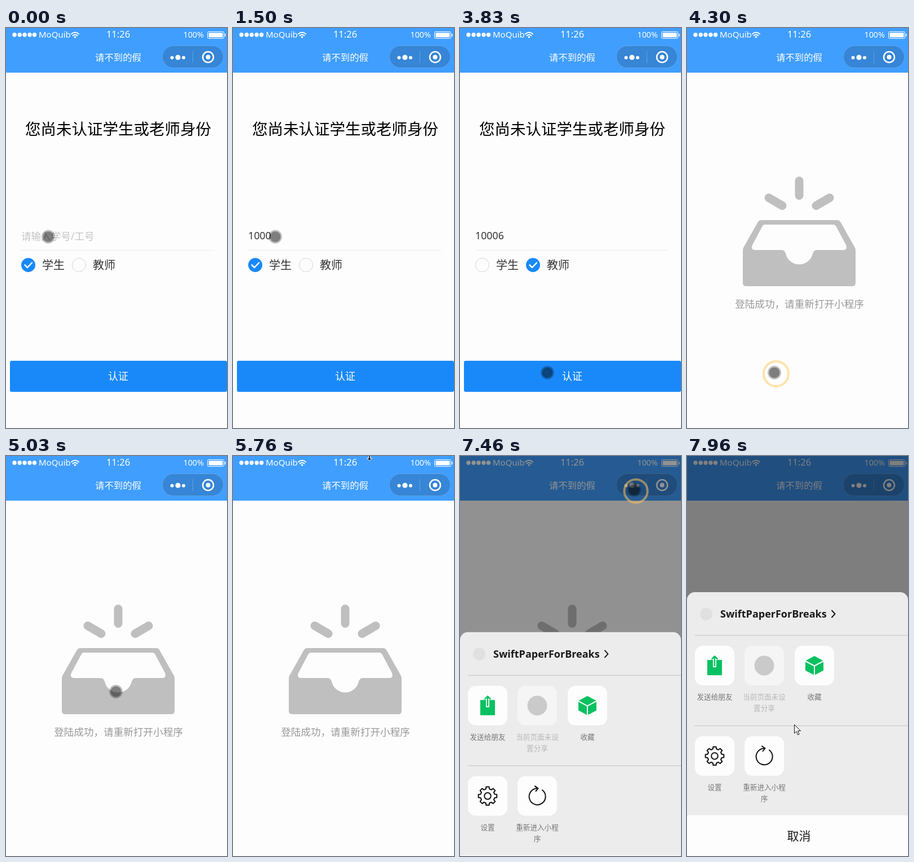
Write an HTML page that moves like this. It is 392 px wide and 708 px high and loops after 8000 ms.

```html
<!DOCTYPE html>
<html lang="zh-CN">
<head>
<meta charset="utf-8">
<style>
  html, body { margin: 0; width: 100%; height: 100%; overflow: hidden; background: #fdfdfd; }
  svg { display: block; width: 392px; height: 708px; }
  text { font-family: "Noto Sans", "Noto Sans CJK SC", sans-serif; }
  .mid { text-anchor: middle; }
  .line { fill: none; stroke-linecap: round; stroke-linejoin: round; }
</style>
</head>
<body>
<svg viewBox="0 0 392 708">
  <rect width="392" height="708" fill="#fdfdfd"/>

  <g id="form">
    <text class="mid" x="199" y="189" font-size="27.5">您尚未认证学生或老师身份</text>
    <text id="hint" x="27" y="374.5" font-size="17.6" fill="#c4c4c4">请输入学号/工号</text>
    <text id="value" x="27" y="374" font-size="17.8" fill="#333"></text>
    <rect id="caret" y="358" width="1" height="20" fill="#222"/>
    <path d="M27 393.5H370" stroke="#ebebeb"/>
    <g id="radios"></g>
    <text x="64" y="426.5" font-size="20" fill="#333">学生</text>
    <text x="154" y="426.5" font-size="20" fill="#333">教师</text>
    <rect x="7" y="589" width="385" height="55" rx="3" fill="#1989fa"/>
    <text class="mid" x="199" y="622.5" font-size="18" fill="#fff">认证</text>
  </g>

  <g id="result">
    <g fill="#bfbfbf">
      <path fill-rule="evenodd" d="M131 340H267Q270 340 272 343L298 389Q299 391 299 394V451Q299 457 293 457H105Q99 457 99 451V394Q99 391 100 389L126 343Q128 340 131 340Z
        M138 348H259Q263 348 265 352L282 384Q285 393 277 393H230Q225 393 223 399A24.5 24.5 0 0 1 175 399Q173 393 168 393H121Q113 393 115.5 385L133 352Q135 348 138 348Z"/>
      <path class="line" stroke="#bfbfbf" stroke-width="15" d="M199 270.5V296.5M145 300.5L169 314.5M253 300.5L229 314.5"/>
    </g>
    <text class="mid" x="199.5" y="495" font-size="17.6" fill="#999">登陆成功，请重新打开小程序</text>
  </g>

  <g id="header" fill="#fff">
    <rect width="392" height="79" fill="#409eff"/>
    <g id="signal"></g>
    <text x="58" y="16.5" font-size="15">MoQuib</text>
    <path class="line" stroke="#fff" stroke-width="2" d="M116 10.5Q122.5 5 129 10.5M118.5 13.5Q122.5 10 126.5 13.5"/>
    <circle cx="122.5" cy="16" r="1.8"/>
    <text class="mid" x="199" y="17" font-size="16.5">11:26</text>
    <text x="314.5" y="17" font-size="14.3">100%</text>
    <rect x="357.5" y="6.5" width="29" height="12" rx="2" fill="none" stroke="#fff"/>
    <rect x="359.5" y="8.5" width="25" height="8"/>
    <path d="M388 10h1.5v5H388z"/>
    <text class="mid" x="199" y="58" font-size="16.4">请不到的假</text>
    <rect x="277.5" y="31.5" width="108" height="39" rx="19.5" fill="#3685d6" stroke="#5fa3e6"/>
    <path d="M331.5 41V62" stroke="#5fa3e6"/>
    <circle cx="294.5" cy="52.5" r="3"/>
    <circle cx="305" cy="52" r="4.6"/>
    <circle cx="315" cy="52.5" r="3"/>
    <circle cx="358.5" cy="51.5" r="9.5" fill="none" stroke="#fff" stroke-width="2.5"/>
    <circle cx="358.5" cy="51.5" r="4"/>
  </g>

  <rect id="shade" width="392" height="708" fill="rgba(0,0,0,.5)"/>

  <g id="sheet">
    <rect y="241" width="392" height="490" rx="14" fill="#ececec"/>
    <circle cx="34" cy="280" r="11" fill="#e0e0e0"/>
    <text x="59" y="286" font-size="18" font-weight="700" fill="#1a1a1a">SwiftPaperForBreaks</text>
    <path class="line" d="M257 273.5L262.5 279.5L257 285.5" stroke="#1a1a1a" stroke-width="2"/>
    <path d="M14 317.5H392M14 477.5H392" stroke="#cfcfcf" stroke-width="1.5"/>
    <g id="tiles"></g>
    <path d="M36 361H62V388H36Z" fill="#07c160"/>
    <path d="M49 360V374" stroke="#fdfdfd" stroke-width="6"/>
    <path class="line" d="M49 355V371M44.5 359L49 354.5L53.5 359" stroke="#07c160" stroke-width="2.5"/>
    <circle cx="137" cy="371" r="17.5" fill="#cacaca"/>
    <path d="M226 354L242 362.5V379.5L226 388L210 379.5V362.5Z" fill="#07c160"/>
    <path d="M210 363L226 371.5L242 363M226 371.5V388" fill="none" stroke="#fdfdfd" stroke-width="2"/>
    <path id="gear" class="line" stroke="#111" stroke-width="2"/>
    <circle cx="49" cy="531" r="5.8" fill="none" stroke="#111" stroke-width="2"/>
    <path class="line" d="M146 520.5A14.5 14.5 0 1 1 137 517.5M133 513.5L138.5 517.5L134.5 522.5" stroke="#111" stroke-width="2"/>
    <rect y="636" width="392" height="110" fill="#fdfdfd"/>
    <text class="mid" x="198.5" y="680" font-size="21" fill="#1a1a1a">取消</text>
  </g>

  <circle id="ring" fill="none" stroke="#ffc65a" stroke-width="4"/>
  <g id="touch">
    <circle r="9.5" fill="rgba(0,0,0,.5)"/>
    <circle r="10.7" fill="none" stroke="rgba(0,0,0,.25)" stroke-width="2.4"/>
  </g>
  <path id="resize" d="M-1.5 -4V4H-4.5L0 8.5L4.5 4H1.5V-4Z" fill="#222" stroke="#fff"/>
  <path id="arrow" d="M.5 .5V16L4 12.5L6.5 18.5L9 17.5L6.5 11.5H11.5Z" fill="#fff" stroke="#111"/>
</svg>
<script>
const $ = id => document.getElementById(id);
const show = (id, on) => $(id).style.display = on ? '' : 'none';
const place = (id, x, y) => $(id).setAttribute('transform', `translate(${x} ${y})`);
const within = (t, a, b) => t >= a && t < b;

$('signal').innerHTML = [15, 24.2, 33, 42, 50.5].map(x => `<circle cx="${x}" cy="12" r="3.7"/>`).join('');

const tiles = [
  [14, 336, ['发送给朋友']],
  [102, 336, ['当前页面未设', '置分享'], true],
  [191, 336, ['收藏']],
  [14, 496, ['设置']],
  [102, 496, ['重新进入小程', '序']]
];
$('tiles').innerHTML = tiles.map(([x, y, lines, off]) =>
  `<rect x="${x}" y="${y}" width="70" height="70" rx="14" fill="${off ? '#f5f5f5' : '#fdfdfd'}"/>` +
  lines.map((s, i) => `<text class="mid" x="${x + 35}" y="${y + 94.7 + 20 * i}" font-size="12.6" fill="${off ? '#b8b8b8' : '#777'}">${s}</text>`).join('')
).join('');

// Eight teeth, four corners each
const teeth = Array.from({ length: 32 }, (_, i) => {
  const r = i % 4 < 2 ? 16.5 : 12.8;
  const a = (Math.floor(i / 4) + [-.2, .2, .32, .68][i % 4]) * Math.PI / 4;
  return `${(49 + r * Math.sin(a)).toFixed(1)} ${(531 - r * Math.cos(a)).toFixed(1)}`;
});
$('gear').setAttribute('d', `M${teeth.join('L')}Z`);

const radio = (x, on) => on
  ? `<circle cx="${x}" cy="419.5" r="12.5" fill="#1989fa"/><path class="line" d="M${x - 6} 419.5l4.5 4.5l8 -8.5" stroke="#fff" stroke-width="2.5"/>`
  : `<circle cx="${x}" cy="419.5" r="12" fill="none" stroke="#d4d4d4"/>`;

// Keyframes: time, x, y
const touchPath = [
  [2700, 75, 369.5], [2930, 131.5, 404.5], [2980, 133, 417], [3250, 133, 419], [3530, 149, 515],
  [3800, 155, 610], [4400, 155, 610], [4600, 157, 557], [4770, 157, 557], [5100, 205, 380],
  [5350, 274, 160], [5600, 241, 18], [5680, 241, 4],
  [6810, 250, -12], [7000, 296, 62], [7100, 309.5, 83], [7180, 309, 60]
];
const arrowPath = [[7640, 309, 60], [7930, 190, 475]];

function at(path, t) {
  const i = path.findIndex(k => k[0] > t);
  if (i < 1) return path.at(i).slice(1);
  const [a, b] = [path[i - 1], path[i]];
  const p = (t - a[0]) / (b[0] - a[0]);
  return [1, 2].map(n => a[n] + (b[n] - a[n]) * p);
}

const rippleTime = 600;
const clicks = [[2980, 135, 420], [4000, 158, 612], [7180, 312, 62]];
const keys = [[200, '1'], [500, '10'], [730, '100'], [900, '1000'], [1930, '10006']];

function draw() {
  const t = performance.now() % 8000;
  const done = t >= 4130;
  show('form', !done);
  show('result', done);

  const typed = keys.filter(k => t >= k[0]).pop()?.[1] ?? '';
  show('hint', !typed);
  $('value').textContent = typed;
  $('caret').setAttribute('x', 27.5 + typed.length * 10.18);
  show('caret', within(t, 200, 1400) || within(t, 1930, 2530));
  const teacher = t >= 3080;
  $('radios').innerHTML = radio(39.5, !teacher) + radio(129.5, teacher);

  const slide = Math.min(1, Math.max(0, (t - 7330) / 280));
  const open = 1 - (1 - slide) ** 3;
  $('shade').setAttribute('opacity', open);
  place('sheet', 0, 470 * (1 - open));

  const click = clicks.find(c => within(t, c[0], c[0] + rippleTime));
  show('ring', click);
  if (click) {
    const p = (t - click[0]) / rippleTime;
    place('ring', click[1], click[2]);
    $('ring').setAttribute('r', 44 * p);
    $('ring').setAttribute('opacity', 1 - p);
  }

  show('touch', t < 5680 || within(t, 6830, 7640));
  place('touch', ...at(touchPath, t));
  show('resize', within(t, 5680, 6060) || within(t, 6330, 6400));
  place('resize', t < 6200 ? 242 : 249, 0);
  show('arrow', t >= 7640);
  place('arrow', ...at(arrowPath, t));
  requestAnimationFrame(draw);
}
draw();
</script>
</body>
</html>
```
